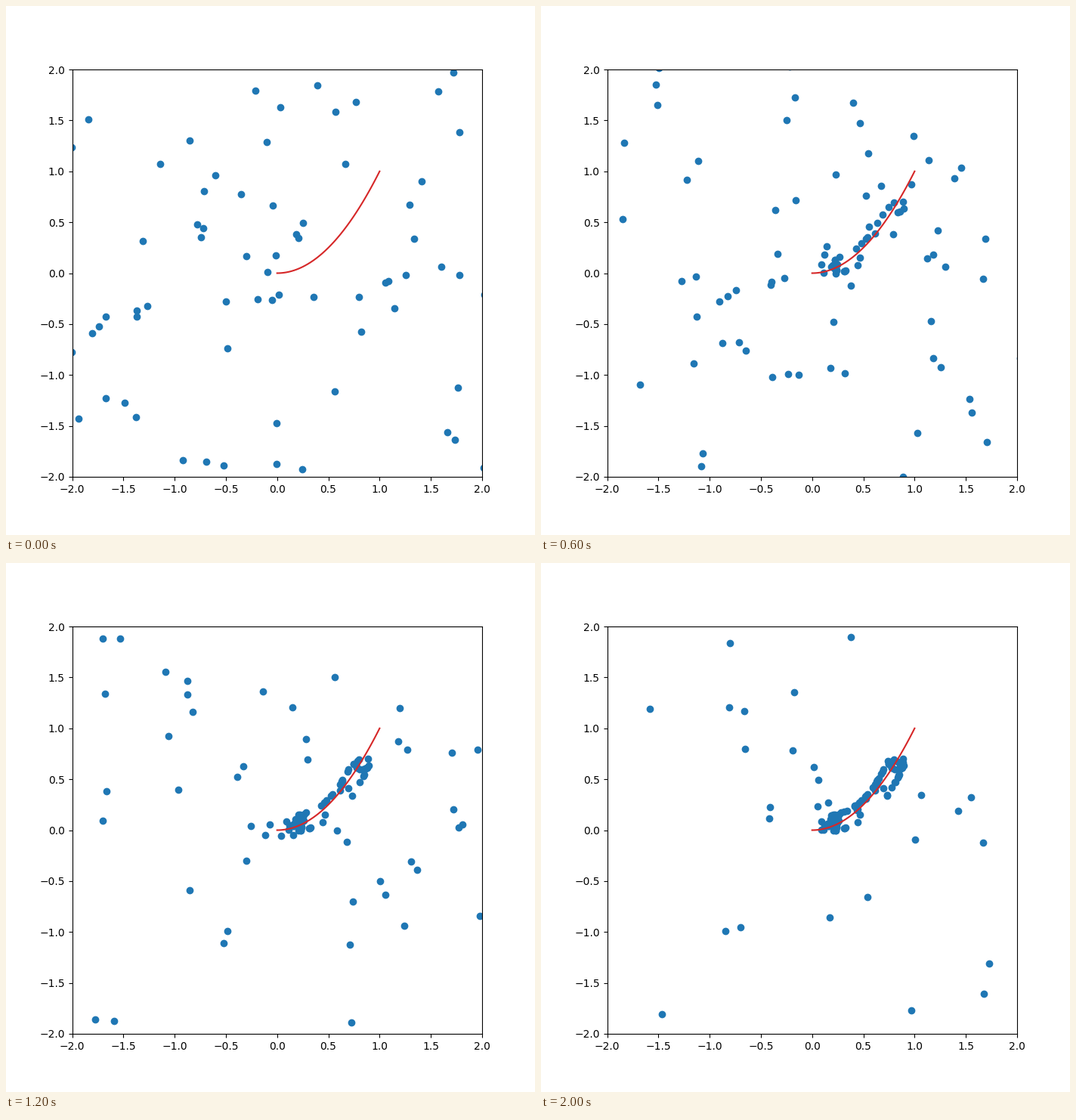
These frames come from a looping animation (700x700 px, 2.2 s). A matplotlib script:

```python
import numpy as np
import matplotlib.pyplot as plt
from matplotlib.animation import FuncAnimation

STEPS = 11
INTERVAL = 200
COUNT = 140
SPREAD = 2.1
REST = .085     # points this close to the valley stand still
TOP_SPEED = .4

# The valley the points gather in, slightly off the drawn parabola
t = np.linspace(.15, .83, 100)
valley = np.column_stack([t, .06 + 1.1 * t**3])


def velocity(p):
    """Pull towards a soft mean of the valley, sharper when nearer."""
    sq = ((p[:, None] - valley)**2).sum(axis=2)
    near = np.sqrt(sq.min(axis=1))
    sigma = .02 + .42 * near**1.5
    w = np.exp((near[:, None]**2 - sq) / (2 * sigma[:, None]**2))
    pull = w @ valley / w.sum(axis=1, keepdims=True) - p
    dist = np.hypot(*pull.T) + 1e-9
    u = pull / dist[:, None]

    # A little faster along the rising diagonal and close to the valley
    speed = .26 + .044 * u[:, 0] * u[:, 1] + .09 / dist
    speed = np.minimum(speed, np.minimum(TOP_SPEED, .08 + dist))
    speed[near < REST] = 0
    return u * speed[:, None]


def trace():
    rng = np.random.default_rng(4)
    path = [rng.normal(0, SPREAD, (COUNT, 2))]
    for _ in range(STEPS - 1):
        path.append(path[-1] + velocity(path[-1]))
    return path


path = trace()

fig, ax = plt.subplots(figsize=(7, 7), dpi=100)
ax.set_xlim(-2, 2)
ax.set_ylim(-2, 2)
x = np.linspace(0, 1, 100)
ax.plot(x, x**2, color="tab:red")
dots, = ax.plot([], [], "o", color="tab:blue", zorder=1)


def update(k):
    dots.set_data(*path[k].T)
    return dots,


anim = FuncAnimation(fig, update, frames=STEPS, interval=INTERVAL, repeat=True)
plt.show()
```
